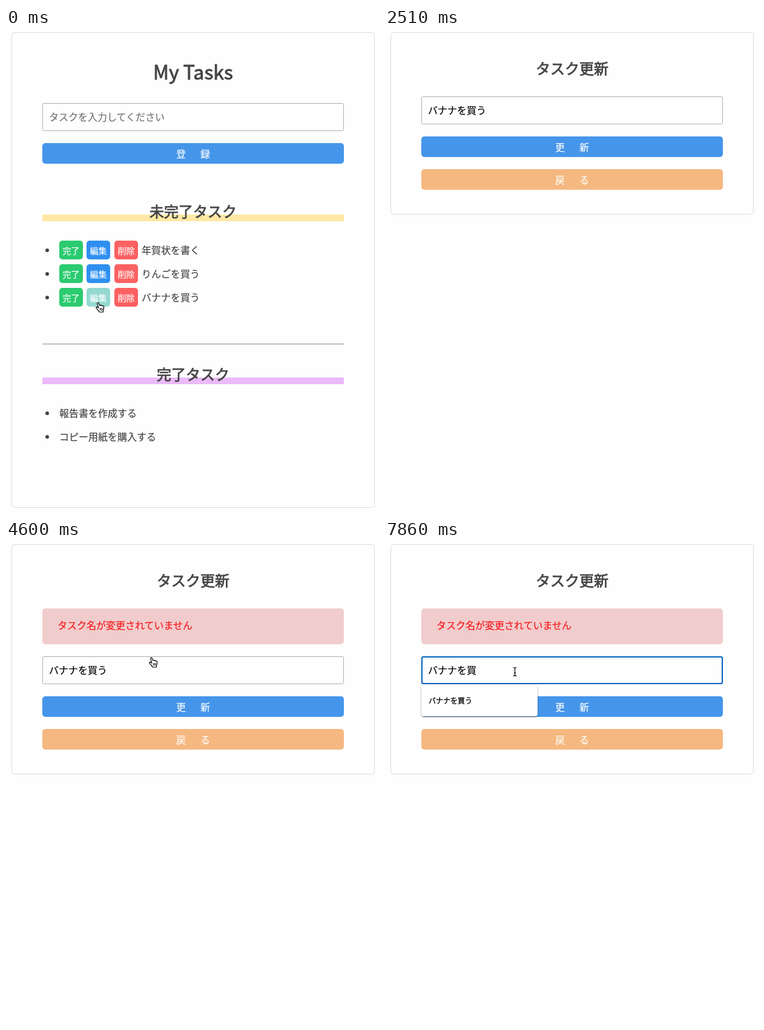
An HTML page that plays this animation: 616x799 px, repeating every 8 s.

```html
<!DOCTYPE html>
<html lang="ja">
<head>
<meta charset="utf-8">
<title>My Tasks</title>
<style>
  html, body { margin: 0; width: 100%; height: 100%; overflow: hidden; background: #fefefe; }
  svg { display: block; width: 616px; height: 799px; }
  text { font: 400 16px "Noto Sans CJK JP", "Noto Sans CJK", sans-serif; stroke-width: .2px; }
  .heading { font-size: 24px; stroke-width: .8px; }
  .title { font-size: 32px; stroke-width: .9px; }
  .small { font-size: 14px; }
  .hint { font-size: 12px; stroke-width: .4px; }
</style>
</head>
<body>
<svg viewBox="0 0 616 799">
  <defs>
    <clipPath id="belowInput"><rect x="50" y="238" width="220" height="70"/></clipPath>
    <filter id="shadow" x="-10%" y="-20%" width="120%" height="150%">
      <feDropShadow dx="0" dy="1" stdDeviation="1" flood-opacity=".5"/>
    </filter>
    <g id="hand" stroke="#000" stroke-linecap="round" stroke-linejoin="round">
      <path fill="#fff" stroke-width="1.2" d="M-1.2 2C-1.8.3.6-.6 1.3 1.2L2.8 5.2C3 3.8 5 4 5.2 5.4C5.6 4.4 7.3 4.8 7.4 6C8 5.2 9.6 5.8 9.6 7C9.8 9 9.4 11 8.6 13L8.4 16H2.4C1.5 14-.5 12.5-2.5 10C-4.2 8-2.5 6.7-1 8L.8 9.2Z"/>
      <path stroke-width=".9" d="M3.4 9.5V13M5.3 9.5V13M7.1 9.5V13"/>
    </g>
    <path id="arrow" stroke="#fff" d="M0 0V13.5L3.1 10.6 5.1 15.2 7.3 14.2 5.3 9.8H9.7Z" style="filter:drop-shadow(0 1px 1px #0006)"/>
    <path id="beamLine" fill="none" d="M-3-7Q0-7 0-5Q0-7 3-7M0-5V5M-3 7Q0 7 0 5Q0 7 3 7M-1.5 2H1.5"/>
    <g id="beam">
      <use href="#beamLine" stroke="#fff" stroke-width="2.5"/>
      <use href="#beamLine" stroke="#000" stroke-width="1.2"/>
    </g>
  </defs>
  <g id="page"></g>
  <use id="cursor"/>
</svg>
<script>
const LOOP = 8000;
const INK = '#444', BLUE = '#4595ea', TEAL = '#94d9d0', ORANGE = '#f5b881';
const page = document.getElementById('page');
const cursor = document.getElementById('cursor');

const text = (x, y, s, color = INK, cls = '', anchor = 'start') =>
  `<text x="${x}" y="${y}" class="${cls}" fill="${color}" stroke="${color}" text-anchor="${anchor}">${s}</text>`;
const box = (x, y, w, h, fill, r = 5) =>
  `<rect x="${x}" y="${y}" width="${w}" height="${h}" rx="${r}" fill="${fill}"/>`;
const frame = (x, y, w, h, color, r, line = 1) =>
  `<rect x="${x + line / 2}" y="${y + line / 2}" width="${w - line}" height="${h - line}" rx="${r}" fill="#fefefe" stroke="${color}" stroke-width="${line}"/>`;
const card = h => frame(9, 7, 600, h, '#dadada', 5);
const heading = (y, s) => text(309, y, s, INK, 'heading', 'middle');
const wideButton = (y, [a, b], color) =>
  box(60, y, 498, 34, color) + text(281, y + 24, a, '#fff') + text(321, y + 24, b, '#fff');
const input = (y, s, color, focused) =>
  frame(60, y, 498, 46, focused ? '#0060c0' : '#adadad', 2, focused ? 2 : 1) + text(71, y + 29, s, color);
const bullet = y => `<circle cx="68" cy="${y}" r="3" fill="${INK}"/>`;
const chip = (x, y, s, color) => box(x, y - 16, 39, 31, color) + text(x + 5.5, y + 6, s, '#fff', 'small');

function listPage() {
  const open = ['年賀状を書く', 'りんごを買う', 'バナナを買う'].map((s, i) => {
    const y = 367 + 39 * i;
    return bullet(y) + chip(88, y, '完了', '#2bcb70') + chip(133, y, '編集', i == 2 ? TEAL : '#2f8ff1')
      + chip(179, y, '削除', '#fb6162') + text(224, y + 6, s);
  });
  const done = ['報告書を作成する', 'コピー用紙を購入する'].map((s, i) =>
    bullet(636 + 39 * i) + text(88, 642 + 39 * i, s));
  return card(785) + text(309, 85, 'My Tasks', INK, 'title', 'middle')
    + input(124, 'タスクを入力してください', '#757575') + wideButton(190, '登録', BLUE)
    + box(60, 308, 498, 11, '#ffe8a3', 0) + heading(312, '未完了タスク') + open.join('')
    + box(60, 521, 498, 1, '#999', 0) + box(60, 522, 498, 1, '#e4e4e4', 0)
    + box(60, 577, 498, 11, '#ebbaf8', 0) + heading(581, '完了タスク') + done.join('');
}

function editPage({ hover, error, focused, caret, value = 'バナナを買う', suggest }) {
  const top = error ? 192 : 113;
  return card(top + 188 + 7) .replace('height="' + (top + 194) + '"', `height="${top + 187}"`)
    + heading(76, 'タスク更新')
    + (error ? box(60, 113, 498, 59, '#f1cccc') + text(85, 147, 'タスク名が変更されていません', '#f5191c') : '')
    + input(top, value, '#000', focused)
    + (caret ? box(167, top + 11, 1, 24, '#000', 0) : '')
    + wideButton(top + 66, '更新', hover ? TEAL : BLUE) + wideButton(top + 120, '戻る', ORANGE)
    + (suggest ? `<g clip-path="url(#belowInput)"><g filter="url(#shadow)">${box(60, 239, 192, 52, '#fff', 4)}</g></g>`
      + text(72, 269.5, 'バナナを買う', '#111', 'hint') : '');
}

// Each entry: start time, page markup
const pages = [
  [0, listPage()],
  [1040, editPage({})],
  [3110, editPage({ hover: true })],
  [4600, editPage({ error: true })],
  [7120, editPage({ error: true, focused: true, caret: true })],
  [7560, editPage({ error: true, focused: true })],
  [7860, editPage({ error: true, focused: true, value: 'バナナを買', suggest: true })]
];

// Each entry: start time, pointer shape, x, y
const pointer = [
  [0, 'hand', 152, 453],
  [1790, 'arrow', 230, 440], [1940, 'arrow', 447, 420], [2090, 'arrow', 330, 390],
  [2240, 'arrow', 190, 365], [2370, 'arrow', 91, 350], [2510, ''],
  [2960, 'arrow', 275, 170], [3110, 'hand', 263, 182], [3260, 'hand', 253, 188],
  [3410, 'hand', 245, 192], [3560, 'hand', 240, 194],
  [5350, 'arrow', 270, 168], [5500, 'arrow', 300, 145], [5640, 'arrow', 255, 125],
  [5780, 'arrow', 204, 148], [5930, 'arrow', 238, 168], [6070, 'arrow', 260.5, 175],
  [6370, 'beam', 240, 203], [6520, 'beam', 223, 212], [6670, 'beam', 214.5, 217.5]
];

const at = (steps, t) => steps.findLast(step => step[0] <= t);
let shown;

function draw(now) {
  const t = now % LOOP;
  const current = at(pages, t);
  if (current !== shown) {
    page.innerHTML = current[1];
    shown = current;
  }
  const [, shape, x = 0, y = 0] = at(pointer, t);
  cursor.setAttribute('visibility', shape ? 'visible' : 'hidden');
  cursor.setAttribute('href', '#' + (shape || 'arrow'));
  cursor.setAttribute('transform', `translate(${x} ${y})`);
}

const start = performance.now();
function tick() {
  draw(performance.now() - start);
  requestAnimationFrame(tick);
}
tick();
</script>
</body>
</html>
```
